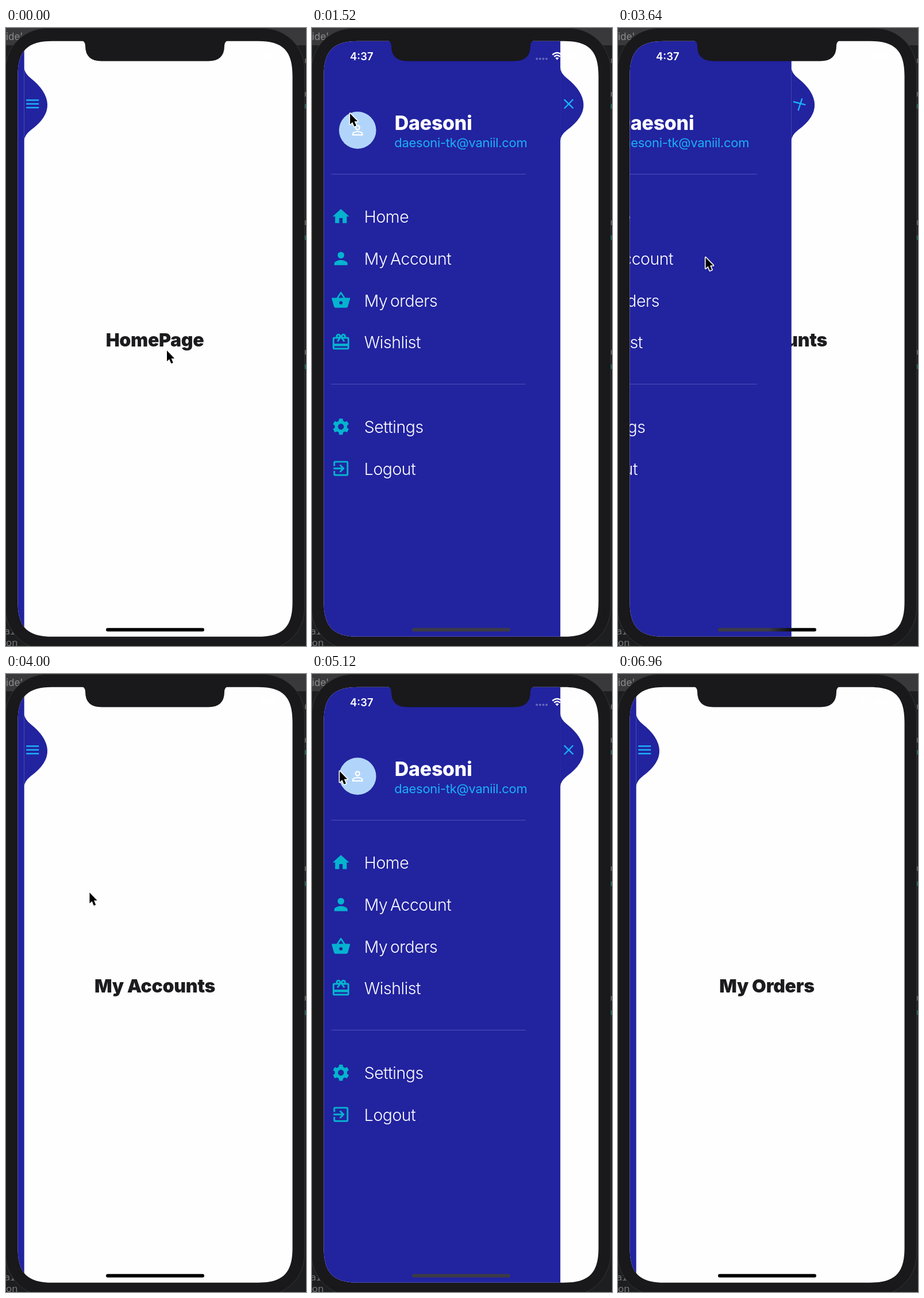
Write an HTML page that moves like this. It is 522 px wide and 1073 px high and loops after 7000 ms.

```html
<!DOCTYPE html>
<html lang="en">
<head>
<meta charset="utf-8">
<title>Sidebar menu</title>
<style>
html, body { margin: 0; width: 100%; height: 100%; overflow: hidden; background: #1d1e20; }
svg { display: block; width: 522px; height: 1073px; font-family: Inter, "Open Sans", sans-serif; }
.mono { font: 17px "Noto Sans Mono", monospace; fill: #77787a; }
.page { font-size: 32px; font-weight: 900; letter-spacing: -.3px; fill: #1c1c1e; text-anchor: middle; }
.name { font-size: 34px; font-weight: 800; fill: #fff; letter-spacing: -.3px; }
.mail { font-size: 22px; fill: #1bb0f7; letter-spacing: -.3px; }
.item { font-size: 28.5px; font-weight: 300; fill: #fff; letter-spacing: -.5px; word-spacing: -3px; }
.clock { font-size: 18.5px; font-weight: 600; fill: #fff; }
</style>
</head>
<body>
<svg viewBox="0 0 522 1073">
  <defs>
    <clipPath id="screen"><path id="glass"/></clipPath>
    <linearGradient id="barFill" gradientUnits="userSpaceOnUse" x1="0" x2="1" y1="0" y2="0">
      <stop stop-color="#3c3b45"/><stop offset="1" stop-color="#000"/>
    </linearGradient>
  </defs>

  <!-- editor window behind the device -->
  <rect width="522" height="1073" fill="#1d1e20"/>
  <rect width="522" height="30" fill="#39393b"/>
  <text x="0" y="21" font-size="17" fill="#8b8b8d">ide'</text>
  <text class="mono" x="-3" y="1053">ar</text>
  <text class="mono" x="0" y="1073">on _t</text>
  <g id="code"></g>

  <rect x="-1" y=".5" width="520.5" height="1079" rx="72" fill="#19181b" stroke="#343436"/>

  <g clip-path="url(#screen)">
    <rect width="522" height="1073" fill="#fffeff"/>
    <text id="page" class="page" x="259" y="552.5"></text>
    <g id="panel" fill="#22239f">
      <rect x="-480" width="480" height="1073"/>
      <path transform="translate(-.1 68.7) scale(1.1546)"
        d="M0 0Q0 8 10 16Q34 35 35 55Q36 75 10 94Q0 102 0 110Z"/>
      <g transform="translate(14.5 131.8)" stroke="#1bb0f7" stroke-width="2.4">
        <path id="top"/><path id="mid"/><path id="low"/>
      </g>
    </g>
    <path id="rules" stroke="#fff" stroke-opacity=".22" stroke-width="1"/>
    <g id="menu">
      <circle cx="108" cy="177.5" r="32.3" fill="#b1d5fa"/>
      <text class="name" x="172.5" y="177">Daesoni</text>
      <text class="mail" x="172" y="206.5">daesoni-tk@vaniil.com</text>
    </g>

    <g fill="#fff">
      <text class="clock" x="66" y="56">4:37</text>
      <g opacity=".3">
        <circle cx="391.3" cy="53.5" r="2"/><circle cx="396.9" cy="53.5" r="2"/>
        <circle cx="402.5" cy="53.5" r="2"/><circle cx="408.1" cy="53.5" r="2"/>
      </g>
      <path d="M426.5 55.5l-3-3.2q3-2.4 6 0z"/>
      <path d="M421.3 49.7q5.2-4.4 10.4 0M418.3 46.5q8.2-7 16.4 0" fill="none" stroke="#fff" stroke-width="2.5"/>
      <rect x="443.5" y="42.5" width="26" height="13" rx="4" fill="none" stroke="#fff" stroke-opacity=".45"/>
      <rect x="445.5" y="44.5" width="22" height="9" rx="2"/>
    </g>
  </g>
  <path d="M130 21Q138 22.5 138 31Q138 57.5 166 57.5H352Q380 57.5 380 31Q380 22.5 388 21Z" fill="#19181b"/>
  <rect x="174" y="1041.8" width="171" height="5.9" rx="2.9" fill="url(#barFill)"/>
  <path id="cursor" d="M0 0V18.8L4.2 15 7.4 22.6 10.8 21.2 7.6 13.7H13.2Z"
    stroke="#fff" stroke-width="3.2" paint-order="stroke" stroke-linejoin="round"/>
</svg>
<script>
const LOOP = 7000, STEP = 40, SLIDE = 500;
const $ = id => document.getElementById(id);
const clamp = v => Math.min(1, Math.max(0, v));

function add(parent, tag, attrs, text = '') {
  const el = document.createElementNS('http://www.w3.org/2000/svg', tag);
  for (const key in attrs) el.setAttribute(key, attrs[key]);
  el.textContent = text;
  parent.append(el);
  return el;
}

// Rectangle whose corners ease into the sides, like the device's glass
function softRect(x, y, w, h, reach, pull) {
  const a = reach * pull, b = reach - a, r = x + w, d = y + h;
  return `M${x + reach} ${y}H${r - reach}c${a} 0 ${reach} ${b} ${reach} ${reach}V${d - reach}` +
    `c0 ${a} ${-b} ${reach} ${-reach} ${reach}H${x + reach}c${-a} 0 ${-reach} ${-b} ${-reach} ${-reach}` +
    `V${y + reach}c0 ${-a} ${b} ${-reach} ${reach} ${-reach}Z`;
}
$('glass').setAttribute('d', softRect(20.5, 22.8, 478, 1034, 60, .72));

// 24-unit icons, centred on a point
function icon(x, y, size, fill, d) {
  const s = size / 24;
  add($('menu'), 'path', { d, fill, transform: `translate(${x - size / 2} ${y - size / 2}) scale(${s})`, 'fill-rule': 'evenodd' });
}

icon(108, 177.5, 27.7, '#fff', 'M12 5.9a2.1 2.1 0 1 1 0 4.2a2.1 2.1 0 1 1 0-4.2m0 9c2.97 0 6.1 1.46 6.1 2.1v1.1H5.9V17c0-.64 3.13-2.1 6.1-2.1M12 4a4 4 0 1 0 0 8a4 4 0 1 0 0-8zm0 9c-2.67 0-8 1.34-8 4v3h16v-3c0-2.66-5.33-4-8-4z');

const gear = [...Array(6)].map((_, i) => {
  const at = (r, deg) => {
    const a = (i * 60 + deg) * Math.PI / 180;
    return `${(12 + r * Math.sin(a)).toFixed(2)} ${(12 - r * Math.cos(a)).toFixed(2)}`;
  };
  return `${i ? 'L' : 'M'}${at(7.5, -20)}L${at(10, -12.5)}L${at(10, 12.5)}L${at(7.5, 20)}`;
}).join('');

const items = [
  ['Home', 328, 'M10 20v-6h4v6h5v-8h3L12 3 2 12h3v8z'],
  ['My Account', 401, 'M12 12a4 4 0 1 0 0-8a4 4 0 1 0 0 8zm0 2c-2.67 0-8 1.34-8 4v2h16v-2c0-2.66-5.33-4-8-4z'],
  ['My orders', 473.5, 'M17.2 9l-4.4-6.6a1 1 0 0 0-1.6 0L6.8 9H2a1 1 0 0 0-1 1.3l2.6 9.2A2 2 0 0 0 5.5 21h13a2 2 0 0 0 1.9-1.5L23 10.2A1 1 0 0 0 22 9zM9 9l3-4.4L15 9zM12 17a2 2 0 1 1 0-4a2 2 0 1 1 0 4z'],
  ['Wishlist', 546, 'M20 6h-2.2A3 3 0 0 0 12.5 3.3L12 4l-.5-.7A3 3 0 0 0 6.2 6H4a2 2 0 0 0-2 2v11a2 2 0 0 0 2 2h16a2 2 0 0 0 2-2V8a2 2 0 0 0-2-2zM15 4a1 1 0 1 1 0 2a1 1 0 1 1 0-2zM9 4a1 1 0 1 1 0 2a1 1 0 1 1 0-2zM20 19H4v-2h16zM20 14H4V8h5.1L7 10.8 8.6 12 12 7.4 15.4 12 17 10.8 14.9 8H20z'],
  ['Settings', 693, gear + 'ZM12 8.4a3.6 3.6 0 1 0 0 7.2a3.6 3.6 0 1 0 0-7.2z'],
  ['Logout', 765.5, 'M10.1 15.6L11.5 17l5-5-5-5-1.4 1.4L12.7 11H3v2h9.7zM19 3H5a2 2 0 0 0-2 2v4h2V5h14v14H5v-4H3v4a2 2 0 0 0 2 2h14a2 2 0 0 0 2-2V5a2 2 0 0 0-2-2z'],
];
for (const [label, y, d] of items) {
  icon(79, y - .8, 34.6, '#05b3cf', d);
  add($('menu'), 'text', { class: 'item', x: 119.5, y: y + 10.3 }, label);
}

for (const [y, fill] of [[57, '#777'], [115, '#777'], [136, '#1f7f70'], [338, '#777'], [364, '#1f7f70'], [563, '#777'], [588, '#1f7f70']])
  add($('code'), 'rect', { x: 520, y: y - 4, width: 2, height: 8, fill, opacity: .7 });

const OPEN = [1050, 4650], CLOSE = [3457, 5910];
const path = [
  [0, 280, 560], [140, 280, 560], [700, 73, 137], [900, 58, 141], [1200, 61.5, 141], [1500, 66, 148],
  [2160, 139, 287], [2400, 141, 317.5], [2720, 92, 675], [2900, 100, 640], [3350, 152, 399], [3640, 152.5, 398.5],
  [3950, 148, 385], [4500, 38, 150], [4800, 39, 153.5], [5100, 48, 168], [5750, 130, 472], [6050, 131, 473.5],
  [6440, 540, 560], [LOOP, 540, 560],
];

function cursorAt(t) {
  const i = path.findIndex(([end]) => end > t);
  const [t0, x0, y0] = path[i - 1], [t1, x1, y1] = path[i];
  const u = (t - t0) / (t1 - t0), k = u * u * (3 - 2 * u);
  return `translate(${x0 + (x1 - x0) * k} ${y0 + (y1 - y0) * k})`;
}

// Menu bars turn half a circle and cross into a close sign
function bar(id, offset, length, turn, lean) {
  const el = $(id);
  el.setAttribute('d', `M${-length / 2} 0H${length / 2}`);
  el.setAttribute('transform', `rotate(${turn}) translate(0 ${offset}) rotate(${lean})`);
}

function draw(t) {
  const ran = start => clamp((t - start) / SLIDE);
  const p = ran(OPEN[0]) - ran(CLOSE[0]) + ran(OPEN[1]) - ran(CLOSE[1]);
  const edge = 31.7 + 426 * p, shift = -478 * (1 - p);

  $('page').textContent = t < CLOSE[0] ? 'HomePage' : t < CLOSE[1] ? 'My Accounts' : 'My Orders';
  $('panel').setAttribute('transform', `translate(${edge} 0)`);
  $('menu').setAttribute('transform', `translate(${shift} 0)`);
  $('rules').setAttribute('d', [253.8, 618.3].map(y => `M${62 + shift} ${y}H${edge - 60}`).join(''));

  const turn = 180 * Math.sin(p * Math.PI / 2), lean = 45 * clamp(1.5 * p);
  const gap = 6.5 * (1 - p) ** 1.6;
  bar('top', -gap, 22, turn, -lean);
  bar('low', gap, 22, turn, lean);
  bar('mid', 0, 22 * clamp(1 - p / .35), turn, 0);

  $('barFill').setAttribute('x1', edge - 40);
  $('barFill').setAttribute('x2', edge + 10);
  $('cursor').setAttribute('transform', cursorAt(t));
}

const begin = performance.now();
function tick() {
  const t = (performance.now() - begin) % LOOP;
  draw(Math.floor(t / STEP) * STEP);
  requestAnimationFrame(tick);
}
tick();
</script>
</body>
</html>
```
